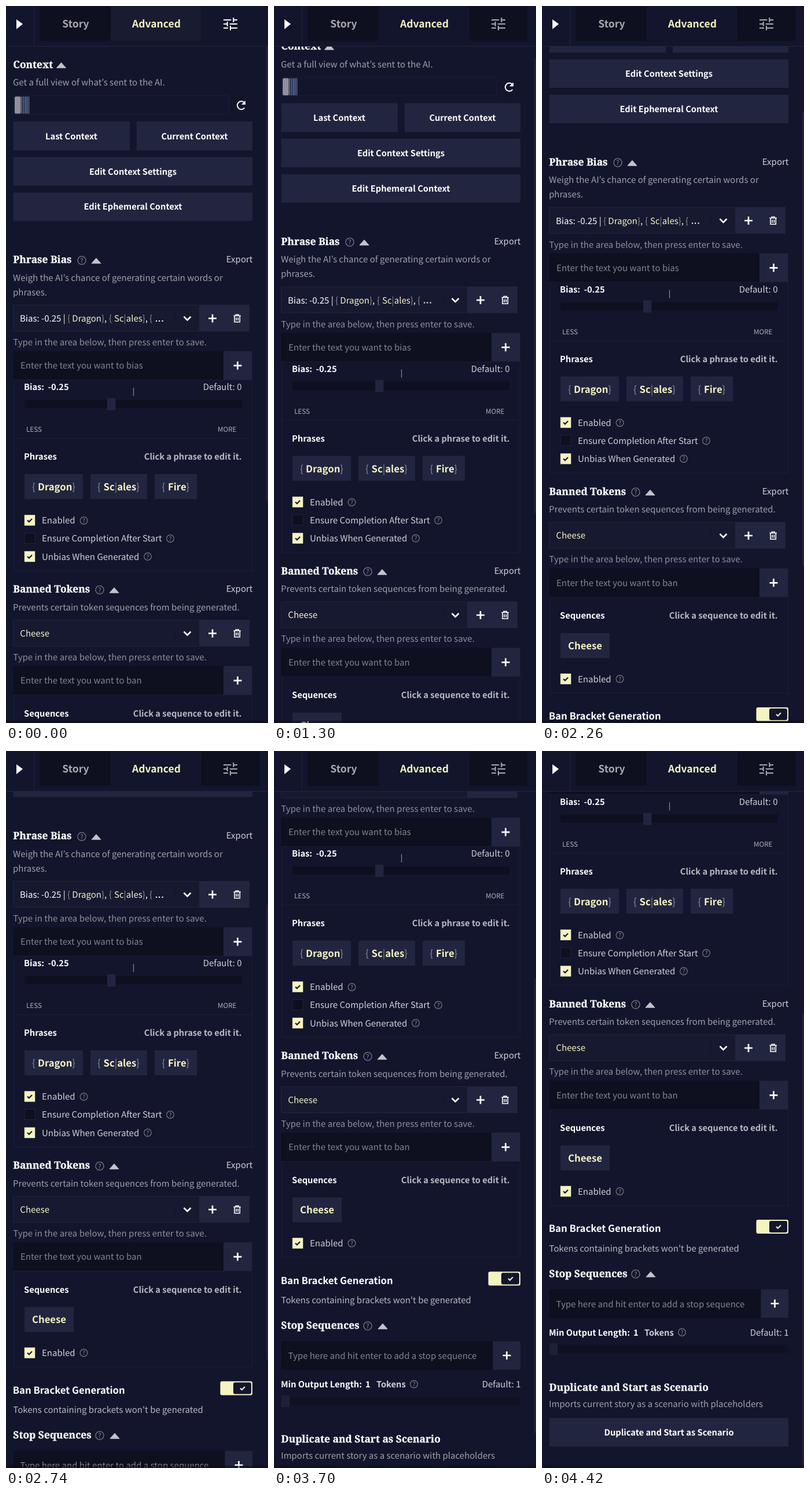
Write an HTML page that moves like this. It is 453 px wide and 1236 px high and loops after 5.26 s.

```html
<!DOCTYPE html>
<html lang="en">
<head>
<meta charset="utf-8">
<title>Advanced settings</title>
<style>
  @property --scroll { syntax: "<number>"; inherits: true; initial-value: 0; }
  html, body { margin: 0; width: 100%; height: 100%; overflow: hidden; background: #13152c; }
  svg { display: block; width: 453px; height: 1236px; animation: scroll 5260ms step-end infinite; }
  text {
    font: 15.02px "Noto Sans CJK JP", "Noto Sans CJK SC", "Noto Sans CJK", "Noto Sans", sans-serif;
    fill: #fff; text-rendering: geometricPrecision;
  }
  .b { font-weight: 700; font-size: 14.67px; }
  .h { font: 700 17.35px "Noto Serif", serif; stroke: #fff; stroke-width: .3; }
  .tab { font-weight: 700; font-size: 17.5px; }
  .big { font-weight: 700; font-size: 16.7px; }
  .small { font-size: 11.7px; fill: #b0b0b9; }
  .mid { text-anchor: middle; }
  .end { text-anchor: end; }
  .cream { fill: #f5f3c2; }
  .soft { fill: #d0d0d5; }
  .note { fill: #b8b9c0; }
  .desc { fill: #9fa0aa; }
  .hint { fill: #8e8f99; }
  .ph { fill: #83848e; }
  .br { fill: #8a8b92; font-weight: 400; }
  .btn { fill: #22253f; }
  .dark { fill: #0e0f1f; }
  .box { fill: none; stroke: #1b1e36; }
  .sel { fill: #171930; stroke: #22253f; }
  .line { fill: none; stroke: #fff; stroke-width: 2; }
  .page { transform: translateY(calc(var(--scroll) * -1px)); }
  .thumb { transform: translateY(calc(var(--scroll) * .672px)); fill: #1e2139; }
  .adv { animation: adv 5260ms step-end infinite; }
  .opt { animation: opt 5260ms step-end infinite; }
  .tune { animation: tune 5260ms step-end infinite; }
  @keyframes adv { 0% { fill: #191b31; } 15.589%, 100% { fill: #13152c; } }
  @keyframes opt { 0% { fill: #13152c; } 15.589%, 100% { fill: #0e0f1f; } }
  @keyframes tune { 0% { stroke: #fff; } 15.589%, 100% { stroke: #a9a9b0; } }
  @keyframes scroll {
    0% { --scroll: 0; }
    20.152% { --scroll: 17; }
    24.714% { --scroll: 31.5; }
    29.277% { --scroll: 53; }
    33.84% { --scroll: 79; }
    38.403% { --scroll: 119; }
    42.965% { --scroll: 168.5; }
    47.528% { --scroll: 227; }
    52.091% { --scroll: 291; }
    56.653% { --scroll: 351; }
    61.216% { --scroll: 403; }
    65.779% { --scroll: 444; }
    70.342% { --scroll: 480; }
    74.904% { --scroll: 513; }
    79.467% { --scroll: 544; }
    84.03%, 100% { --scroll: 569.5; }
  }
</style>
</head>
<body>
<svg viewBox="0 0 453 1236">
  <defs>
    <clipPath id="view"><rect y="70" width="453" height="1166"/></clipPath>
    <path id="up" d="M-8 4.7 0-4.3 8 4.7Z" fill="#c3c3c8" stroke="#c3c3c8" stroke-linejoin="round"/>
    <path id="plus" class="line" d="M-7 0H7M0-7V7" style="stroke-width:2.7"/>
    <path id="down" class="line" d="M-6-3 0 3 6-3" style="stroke-width:2.6"/>
    <path id="tick" d="M-4 0-1.2 2.8 4-2.6" fill="none" stroke="#13152c" stroke-width="2.2"/>
    <path id="trash" class="line" d="M-6.3-4.5H6.3M-2.5-4.5V-6.5H2.5V-4.5M-4.6-4.5V6.3H4.6V-4.5M-1.6-1.5V3.8M1.6-1.5V3.8" style="stroke-width:1.6"/>
    <g id="help">
      <circle r="6.3" fill="none" stroke="#777883" stroke-width="1.2"/>
      <text y="3.7" class="mid" style="font-size:10px;fill:#8a8b95">?</text>
    </g>
    <g id="on">
      <rect x="-9.2" y="-9.2" width="18.4" height="18.4" class="cream"/>
      <use href="#tick"/>
    </g>
    <g id="picker">
      <rect x="12.5" y=".5" width="322" height="45" rx="1" class="sel"/>
      <path d="M292.5 12V34" stroke="#13152a"/>
      <use href="#down" x="313.5" y="23.5"/>
      <rect x="335" width="86" height="46" class="btn"/>
      <use href="#plus" x="357" y="23.5"/>
      <use href="#trash" x="399.7" y="23.5"/>
    </g>
    <g id="entry">
      <rect x="12.5" width="363.5" height="49" class="dark"/>
      <rect x="376" width="49.5" height="49" class="btn"/>
      <use href="#plus" x="400.5" y="24.8"/>
    </g>
  </defs>

  <rect width="453" height="1236" fill="#13152c"/>

  <g clip-path="url(#view)">
    <g class="page">
      <text x="12.3" y="106.5" class="h">Context</text>
      <use href="#up" x="95.5" y="102"/>
      <text x="12" y="137" class="desc">Get a full view of what’s sent to the AI.</text>
      <rect x="13.5" y="154.5" width="372" height="32" rx="2" class="box"/>
      <rect x="15" y="156" width="10.5" height="29.5" rx="2" fill="#8f9099"/>
      <path d="M27 156V185.5M30 156V185.5M33 156V185.5M35.5 156V185.5" stroke="#57709f" stroke-width="1.7"/>
      <path d="M37.7 156V185.5M39.8 156V185.5" stroke="#777c8f"/>
      <path class="line" d="M412.5 175.5A7 7 0 1 1 411.5 166"/>
      <path d="M414 163V170H407Z" fill="#fff"/>
      <rect x="12.5" y="199" width="201.5" height="50" class="btn"/>
      <rect x="226" y="199" width="200" height="50" class="btn"/>
      <rect x="12.5" y="260.5" width="413.5" height="49" class="btn"/>
      <rect x="12.5" y="321.5" width="413.5" height="49" class="btn"/>
      <text x="113" y="229.5" class="b mid">Last Context</text>
      <text x="326" y="229.5" class="b mid">Current Context</text>
      <text x="219.5" y="290.5" class="b mid">Edit Context Settings</text>
      <text x="219.5" y="351" class="b mid">Edit Ephemeral Context</text>

      <text x="12.3" y="443" class="h">Phrase Bias</text>
      <use href="#help" transform="translate(131 438.5) scale(1.12)"/>
      <use href="#up" x="156" y="439"/>
      <text x="426.5" y="442" class="end soft">Export</text>
      <text x="12" y="473.5" class="desc">Weigh the AI’s chance of generating certain words or</text>
      <text x="12" y="498.5" class="desc">phrases.</text>
      <use href="#picker" y="515"/>
      <text y="544" class="cream"><tspan x="24" fill="#fff">Bias: -0.25 |</tspan><tspan x="106" class="br">{</tspan><tspan x="114.3">Dragon</tspan><tspan class="br">}</tspan><tspan fill="#fff">,</tspan><tspan x="178" class="br">{</tspan><tspan x="187">Sc</tspan><tspan class="br">|</tspan><tspan>ales</tspan><tspan class="br">}</tspan><tspan fill="#fff">,</tspan><tspan x="248" class="br">{</tspan></text>
      <path d="M259 543H261.2M264 543H266.2M269.5 543H271.7" stroke="#fff" stroke-width="2.2"/>
      <text x="12.3" y="585" class="hint">Type in the area below, then press enter to save.</text>

      <rect x="13.5" y="644.5" width="412" height="329" class="box"/>
      <use href="#entry" y="595"/>
      <text x="25" y="625" class="ph">Enter the text you want to bias</text>
      <text x="31" y="662" class="b">Bias:</text>
      <text x="72.5" y="662" class="b">-0.25</text>
      <text x="407.5" y="662" class="end soft">Default: 0</text>
      <path d="M220.5 658V672" stroke="#8a8b95" stroke-width="1.2"/>
      <rect x="32" y="679" width="376" height="14" class="dark"/>
      <rect x="175" y="676" width="14.5" height="21" rx="1" class="btn"/>
      <text x="35" y="734" class="small">LESS</text>
      <text x="398.5" y="734" class="small end">MORE</text>
      <path d="M14 745.5H425" class="box"/>
      <text x="31" y="782" class="b">Phrases</text>
      <text x="407.5" y="782" class="b end note">Click a phrase to edit it.</text>
      <path d="M32 807H133V850H32ZM146 807H244V850H146ZM257 807H330V850H257Z" class="btn"/>
      <text y="835" class="big cream"><tspan x="45" class="br">{</tspan><tspan x="55">Dragon</tspan><tspan class="br">}</tspan><tspan x="158" class="br">{</tspan><tspan x="168.5">Sc</tspan><tspan class="br">|</tspan><tspan>ales</tspan><tspan class="br">}</tspan><tspan x="269.5" class="br">{</tspan><tspan x="280">Fire</tspan><tspan class="br">}</tspan></text>
      <use href="#on" x="41" y="886.5"/>
      <rect x="32" y="908.5" width="18" height="18" class="dark" stroke="#22253f"/>
      <use href="#on" x="41" y="949"/>
      <text x="62" y="892" class="soft">Enabled</text>
      <text x="62" y="923" class="soft">Ensure Completion After Start</text>
      <text x="62" y="954.5" class="soft">Unbias When Generated</text>
      <use href="#help" x="134.5" y="887"/>
      <use href="#help" x="284" y="918"/>
      <use href="#help" x="245" y="949"/>

      <text x="12.3" y="1011" class="h">Banned Tokens</text>
      <use href="#help" transform="translate(162 1006.5) scale(1.12)"/>
      <use href="#up" x="187" y="1007"/>
      <text x="426.5" y="1010" class="end soft">Export</text>
      <text x="12" y="1041.5" class="desc">Prevents certain token sequences from being generated.</text>
      <use href="#picker" y="1058"/>
      <text x="24.3" y="1086.5" class="cream">Cheese</text>
      <text x="12.3" y="1127.5" class="hint">Type in the area below, then press enter to save.</text>
      <rect x="13.5" y="1187.5" width="412" height="165.5" class="box"/>
      <use href="#entry" y="1138"/>
      <text x="25" y="1168" class="ph">Enter the text you want to ban</text>
      <text x="31" y="1224.5" class="b">Sequences</text>
      <text x="407.5" y="1224.5" class="b end note">Click a sequence to edit it.</text>
      <rect x="32" y="1249.5" width="85" height="43" class="btn"/>
      <text x="45" y="1277" class="big cream">Cheese</text>
      <use href="#on" x="41" y="1328.5"/>
      <text x="62" y="1334" class="soft">Enabled</text>
      <use href="#help" x="134.5" y="1328.5"/>

      <text x="11.7" y="1398.5" class="big">Ban Bracket Generation</text>
      <rect x="370.5" y="1377.5" width="55.5" height="24" rx="3" class="cream"/>
      <rect x="393" y="1379.5" width="31" height="20" rx="3" fill="#13152c"/>
      <use href="#tick" x="409" y="1389.5" style="filter:invert(1)"/>
      <text x="12.3" y="1432" class="note">Tokens containing brackets won't be generated</text>

      <text x="12.3" y="1476" class="h">Stop Sequences</text>
      <use href="#help" transform="translate(162 1471) scale(1.12)"/>
      <use href="#up" x="188" y="1471.5"/>
      <rect x="12.5" y="1497.5" width="366" height="49" class="dark"/>
      <rect x="378.5" y="1497.5" width="47.5" height="49" class="btn"/>
      <use href="#plus" x="402.5" y="1522"/>
      <text x="24.5" y="1528" class="ph">Type here and hit enter to add a stop sequence</text>
      <text x="12" y="1577" class="b">Min Output Length:</text>
      <text x="158" y="1577" class="b">1</text>
      <text x="177" y="1577" class="b soft">Tokens</text>
      <use href="#help" x="242" y="1571.5"/>
      <text x="426.5" y="1577" class="end soft">Default: 1</text>
      <rect x="13" y="1593.5" width="413" height="14" fill="#101223"/>
      <rect x="13" y="1590.5" width="14" height="20.5" rx="1" fill="#1e2035"/>

      <text x="12.3" y="1672" class="h">Duplicate and Start as Scenario</text>
      <text x="12" y="1700" class="desc">Imports current story as a scenario with placeholders</text>
      <rect x="12.5" y="1719.5" width="413.5" height="49" class="btn"/>
      <text x="219.5" y="1749" class="b mid">Duplicate and Start as Scenario</text>
    </g>
    <rect x="450" y="70" width="3" height="783" class="thumb"/>
    <rect y="1232" width="453" height="4" fill="#0a0b18" opacity=".45"/>
  </g>

  <path d="M18 23 29 31 18 40Z" fill="#fff"/>
  <path d="M48.5 0V69M0 69.5H453" stroke="#22253f"/>
  <rect x="58" y="1" width="123" height="59" class="dark"/>
  <rect x="181" y="1" width="156.5" height="59" class="adv"/>
  <rect x="337.5" y="1" width="100.5" height="59" class="opt"/>
  <text x="120.5" y="37" class="tab mid" style="fill:#a9a9b0">Story</text>
  <text x="260" y="37" class="tab mid cream">Advanced</text>
  <path class="line tune" d="M376 24H389.3M393.3 24H400M393.3 20V28M376 31H382.7M386.7 31H400M382.7 27V35M376 38H384M388 38H400M388 34V42"/>
</svg>
</body>
</html>
```
